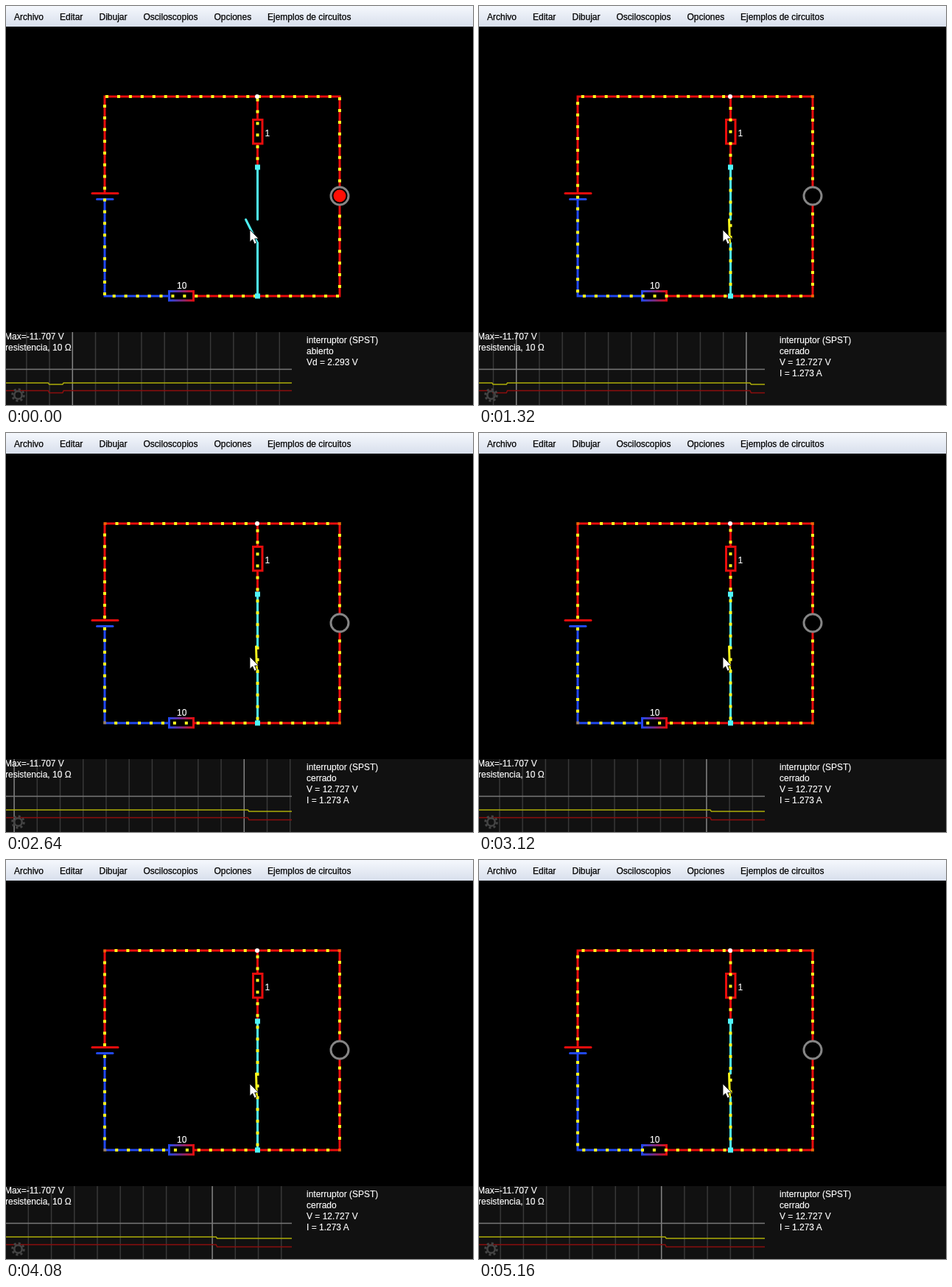
These frames come from a looping animation (634x542 px, 5.28 s). An HTML page:

```html
<!DOCTYPE html>
<html lang="es">
<head>
<meta charset="utf-8">
<title>Circuito</title>
<style>
html, body { margin: 0; width: 100%; height: 100%; overflow: hidden; background: #000; }
svg { display: block; width: 634px; height: 542px; }
text { font: 12px "Liberation Sans", Arial, sans-serif; white-space: pre; }
.menu text { fill: #000; stroke: #000; stroke-width: .25; }
.info text { fill: #fff; stroke: #fff; stroke-width: .15; }
.wire { fill: none; stroke-width: 3; }
.red { stroke: #e80c0c; }
.blue { stroke: #2148f0; }
.cyan { stroke: #4ff4f8; stroke-linecap: round; }
</style>
</head>
<body>
<svg viewBox="0 0 634 542">
  <defs>
    <linearGradient id="bar" x2="0" y2="1">
      <stop stop-color="#f5f8fd"/><stop offset="1" stop-color="#d8dfec"/>
    </linearGradient>
    <linearGradient id="drop" gradientUnits="userSpaceOnUse" x1="221" x2="255" y1="0" y2="0">
      <stop stop-color="#2148f0"/><stop offset=".5" stop-color="#7c2a84"/><stop offset="1" stop-color="#e80c0c"/>
    </linearGradient>
    <clipPath id="scope"><rect y="443" width="388" height="99"/></clipPath>
  </defs>
  <rect width="634" height="542"/>
  <rect width="634" height="28" fill="url(#bar)"/>
  <g class="menu">
    <text x="11" y="19">Archivo</text>
    <text x="73" y="19">Editar</text>
    <text x="126.500" y="19">Dibujar</text>
    <text x="186.500" y="19">Osciloscopios</text>
    <text x="282.500" y="19">Opciones</text>
    <text x="355" y="19">Ejemplos de circuitos</text>
  </g>

  <g class="wire">
    <path class="red" d="M134 254V123H453V246M453 270V394H255M341.500 123V154M341.500 187V219"/>
    <path class="blue" d="M134 262V394H221"/>
    <path class="red" d="M117 254.500H152" stroke-linecap="round"/>
    <path class="blue" d="M123.500 262.500H145" stroke-linecap="round"/>
    <rect class="red" x="335.500" y="154.500" width="12.500" height="32.500"/>
    <rect x="221.500" y="387.500" width="33" height="12.500" stroke="url(#drop)"/>
    <path class="cyan" d="M341.500 219V290M341.500 322V394"/>
    <path id="lever" class="cyan"/>
    <circle cx="453" cy="258" r="12" stroke="#858585"/>
  </g>
  <circle id="lamp" cx="453" cy="258" r="8.500" fill="#ff0f05"/>
  <path id="dots" fill="#ffff1e"/>
  <path id="faint" fill="#ffb400" opacity=".5"/>
  <circle cx="341" cy="123" r="3" fill="#fff"/>
  <path d="M338 215.500h7v7h-7zM338 390.500h7v7h-7z" fill="#4ff4f8"/>
  <g class="info">
    <text x="232" y="384" font-weight="bold">10</text>
    <text x="351.500" y="177" font-weight="bold">1</text>
  </g>
  <path d="M331 304V320.500L334.700 317L337.300 323.300L340.300 322L337.700 316H343Z" fill="#fff" stroke="#000" stroke-width=".8"/>

  <rect y="443" width="634" height="99" fill="#111"/>
  <g clip-path="url(#scope)" fill="none">
    <path id="minor" stroke="#383838" stroke-width="1.500"/>
    <path id="major" stroke="#858585" stroke-width="1.500"/>
    <path d="M0 493.500H388" stroke="#777" stroke-width="1.500"/>
    <path id="volt" stroke="#adad08" stroke-width="1.500"/>
    <path id="amp" stroke="#8c0e0e" stroke-width="1.500"/>
  </g>
  <g fill="none" stroke="#444">
    <circle cx="16.500" cy="528.500" r="5.200" stroke-width="2.600"/>
    <circle cx="16.500" cy="528.500" r="7.800" stroke-width="3" stroke-dasharray="3 3.126"/>
  </g>
  <g class="info">
    <text x="-2" y="453">Max=-11.707 V</text>
    <text x="-1" y="468">resistencia, 10 Ω</text>
    <text x="408" y="458">interruptor (SPST)</text>
    <text id="state" x="408" y="473"></text>
    <text id="line1" x="408" y="488"></text>
    <text id="line2" x="408" y="503"></text>
  </g>
</svg>
<script>
const LOOP = 5280, STEP = 120, CLOSE = 720, GAP = 15.94;
const $ = id => document.getElementById(id);
const set = (id, d) => $(id).setAttribute("d", d);

// Distance the charges have travelled: [ms, px]
const travel = [[0, 3], [600, 39.4], [720, 46.8], [1320, 86.5], [2640, 175.9],
                [3600, 239], [4560, 301.9], [5160, 342.2], [5280, 350]];

function moved(t) {
  const i = Math.max(1, travel.findIndex(k => k[0] >= t));
  const [t0, a] = travel[i - 1], [t1, b] = travel[i];
  return a + (b - a) * (t - t0) / (t1 - t0);
}

const square = (x, y) => `M${(x - 2).toFixed(2)} ${(y - 2).toFixed(2)}h4v4h-4z`;

function charges(x1, y1, x2, y2, phase, out) {
  const len = Math.hypot(x2 - x1, y2 - y1);
  for (let s = phase % GAP; s < len; s += GAP) {
    const x = x1 + (x2 - x1) * s / len, y = y1 + (y2 - y1) * s / len;
    if (x === 453 && y > 245 && y < 271) continue;
    const corner = (x < 135.5 || x > 451.5) && (y < 124.5 || y > 392.5);
    out[corner ? "faint" : "dots"] += square(x, y);
  }
}

function trace(t, high, low) {
  const shift = -0.03 * t;
  let d = `M${Math.min(0, 57 + shift)} ${high}`;
  for (const [x, y0, y1] of [[58, high, low], [77.5, low, high], [408.3, high, low]])
    d += `L${x + shift - .7} ${y0}L${x + shift + .7} ${y1}`;
  return d + `H420`;
}

function draw(t) {
  const closed = t >= CLOSE;
  const main = moved(t);
  const lamp = closed ? 3 * GAP : main;
  const mid = closed ? main - 38.7 : 4.5;
  const out = { dots: "", faint: "" };
  charges(134, 123, 341, 123, main, out);
  charges(341, 123, 453, 123, lamp, out);
  charges(453, 123, 453, 394, lamp, out);
  charges(453, 394, 341, 394, lamp, out);
  charges(341, 394, 134, 394, main, out);
  charges(134, 394, 134, 123, main, out);
  charges(341.5, 123, 341.5, closed ? 394 : 218, mid, out);
  set("dots", out.dots);
  set("faint", out.faint);

  $("lamp").style.display = closed ? "none" : "";
  set("lever", closed ? "M339.5 290L340.5 322" : "M325.5 290L341.5 322");
  $("lever").style.stroke = closed ? "#f6f61c" : "";
  $("state").textContent = closed ? "cerrado" : "abierto";
  $("line1").textContent = closed ? "V = 12.727 V" : "Vd = 2.293 V";
  $("line2").textContent = closed ? "I = 1.273 A" : "";

  const grid = { minor: "", major: "" };
  for (let i = -3; i < 16; i++)
    grid[i % 10 ? "minor" : "major"] += `M${90.3 - 0.03 * t + i * 31.22} 443V542`;
  set("minor", grid.minor);
  set("major", grid.major);
  set("volt", trace(t, 512, 514));
  set("amp", trace(t, 522.5, 525.5));
}

function tick() {
  const t = performance.now() % LOOP;
  draw(Math.floor(t / STEP) * STEP);
  requestAnimationFrame(tick);
}
tick();
</script>
</body>
</html>
```
